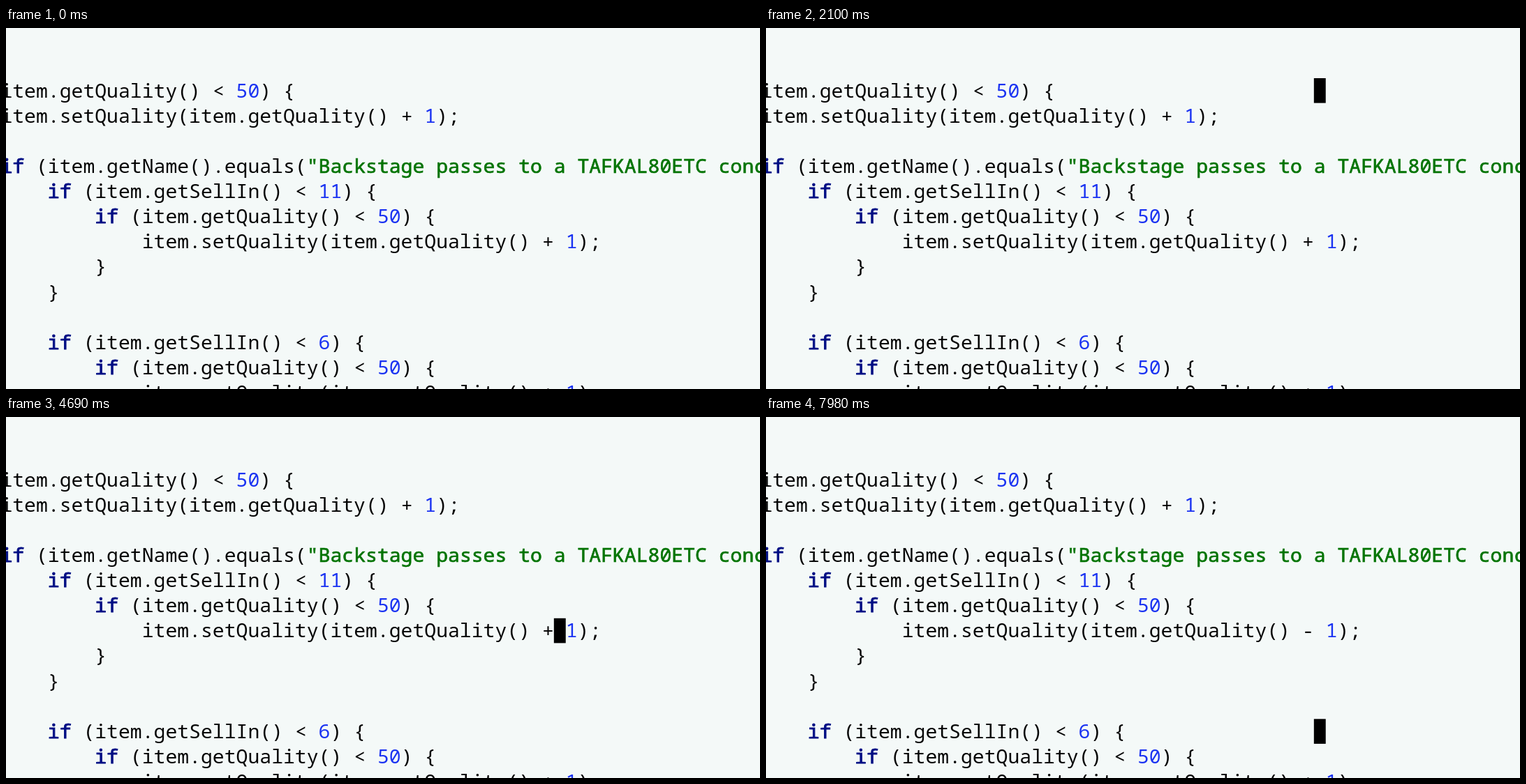
Write an HTML page that moves like this. It is 1080x518 px and loops after 8 s.

```html
<!DOCTYPE html>
<html lang="en">
<head>
<meta charset="utf-8">
<title>Code editing</title>
<style>
  html, body { margin: 0; width: 100%; height: 100%; overflow: hidden; background: #f4f9f8; }
  svg { display: block; width: 100%; height: 100%; }
  text {
    font: 400 28.1px "Noto Sans Mono", "DejaVu Sans Mono", monospace;
    font-variant-ligatures: none;
    white-space: pre;
    fill: #050505;
  }
  .keyword { fill: #000f84; stroke: #000f84; stroke-width: .9px; }
  .string { fill: #047404; stroke: #047404; stroke-width: .7px; }
  .number { fill: #1a32f2; }
  .under { fill: #f4f9f8; }
</style>
</head>
<body>
<svg viewBox="0 0 1080 518" preserveAspectRatio="none">
  <g id="code"></g>
  <g id="cursor">
    <rect width="16.9" height="35.6" fill="#000"/>
    <text class="under"></text>
  </g>
</svg>
<script>
const NS = 'http://www.w3.org/2000/svg';
const LOOP = 8000, TICK = 70;
const LEFT = -7.6, TOP = 72, CELL = 16.86, ROW = 36.13, BASELINE = 27.5;
const EDIT_ROW = 6;
const ENTER = 1260, STOP = 2100, FIRST_COL = 64, LAST_COL = 47;
const BACK = 5110, DELETE = 5600, INSERT = 5880;

const lines = [
  'item.getQuality() < 50) {',
  'item.setQuality(item.getQuality() + 1);',
  '',
  'if (item.getName().equals("Backstage passes to a TAFKAL80ETC concert")) {',
  '    if (item.getSellIn() < 11) {',
  '        if (item.getQuality() < 50) {',
  '            item.setQuality(item.getQuality() + 1);',
  '        }',
  '    }',
  '',
  '    if (item.getSellIn() < 6) {',
  '        if (item.getQuality() < 50) {',
  '            item.setQuality(item.getQuality() + 1);'
];

const code = document.getElementById('code');
const cursor = document.getElementById('cursor');
const under = cursor.querySelector('text');
under.setAttribute('y', BASELINE);

const colX = col => LEFT + col * CELL;
const rowY = row => TOP + row * ROW;
const clamp = (v, lo, hi) => Math.min(hi, Math.max(lo, v));

// Number of key presses made so far in a steady burst
const presses = (t, start, gap, count) =>
  clamp(Math.floor((t - start) / gap) + 1, 0, count);

function rowAt(t) {
  return presses(t, 2380, 280, 2) + presses(t, 3710, 300, 4) +
    presses(t, 7350, 350, 1) + presses(t, 7700, 140, 3);
}

function colAt(t) {
  if (t >= BACK && t < INSERT) return LAST_COL - 1;
  const tick = ENTER + Math.floor((t - ENTER) / TICK) * TICK;
  const left = clamp((STOP - tick) / (STOP - ENTER), 0, 1);
  return LAST_COL + Math.floor(left * (FIRST_COL - LAST_COL));
}

const operatorAt = t => t < DELETE ? '+' : t < INSERT ? '' : '-';

function kind(token) {
  if (token === 'if') return 'keyword';
  if (token[0] === '"') return 'string';
  return /^\d/.test(token) ? 'number' : 'plain';
}

function drawLine(group, line) {
  group.replaceChildren();
  for (const m of line.matchAll(/"[^"]*"|\bif\b|\b\d+|[^\s"\d]+/g)) {
    const run = document.createElementNS(NS, 'text');
    run.setAttribute('class', kind(m[0]));
    run.setAttribute('x', colX(m.index));
    run.textContent = m[0];
    group.append(run);
  }
}

const rows = lines.map((line, i) => {
  const group = document.createElementNS(NS, 'g');
  group.setAttribute('transform', `translate(0 ${rowY(i) + BASELINE})`);
  drawLine(group, line);
  code.append(group);
  return group;
});

let shown = lines[EDIT_ROW];

function render(t) {
  const edited = lines[EDIT_ROW].replace('+', operatorAt(t));
  if (edited !== shown) drawLine(rows[EDIT_ROW], shown = edited);

  const row = rowAt(t), col = colAt(t);
  cursor.style.display = t < ENTER ? 'none' : '';
  cursor.setAttribute('transform', `translate(${colX(col)} ${rowY(row)})`);
  under.textContent = (row === EDIT_ROW ? edited : lines[row])[col] || '';
}

const start = performance.now();
function frame() {
  render((performance.now() - start) % LOOP);
  requestAnimationFrame(frame);
}
frame();
</script>
</body>
</html>
```
